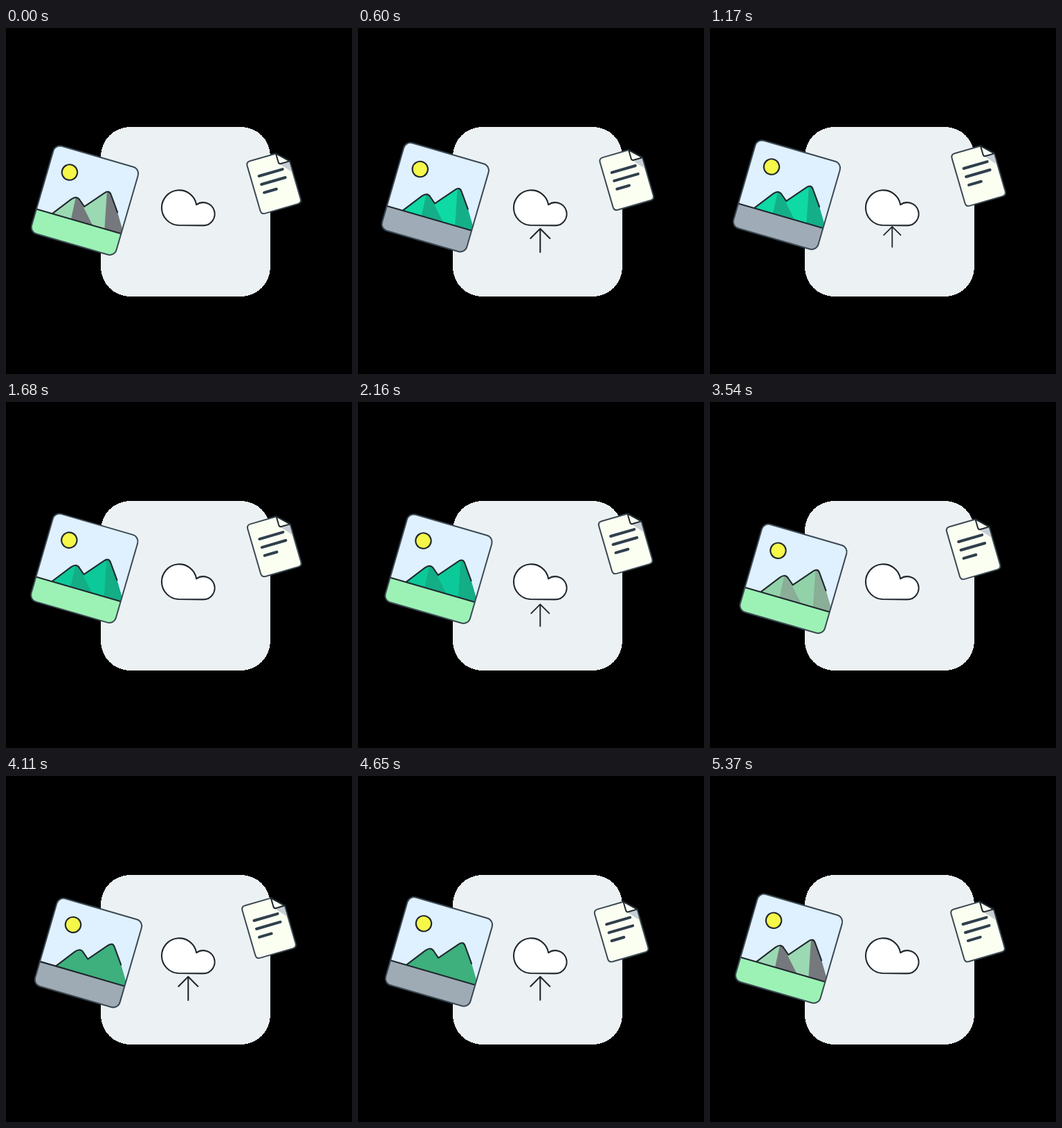
These frames come from a looping animation (500x500 px, 5.43 s). An HTML page:

```html
<!DOCTYPE html>
<html lang="en">
<head>
<meta charset="utf-8">
<title>Upload</title>
<style>
  html, body { margin: 0; width: 100%; height: 100%; overflow: hidden; background: #000; }
  svg { display: block; width: 100%; height: 100%; }
  .line { fill: none; stroke: #20282e; stroke-width: 2.1; stroke-linecap: round; stroke-linejoin: round; }
  .edge { stroke: #3a4852; stroke-width: 2; stroke-linejoin: round; }
</style>
</head>
<body>
<svg viewBox="0 0 500 500">
  <defs>
    <clipPath id="frame"><rect x="-63.5" y="-66.3" width="127.5" height="132" rx="10"/></clipPath>
  </defs>
  <rect x="137" y="143" width="245" height="245" rx="42.5" fill="#ecf1f4" shape-rendering="crispEdges"/>

  <path id="arrow" class="line" d="M0 34V0M-14 14L0 0L14 14"/>
  <path class="line" style="fill:#fff" d="M249 285A25.3 25.3 0 1 1 275.2 255.4A16.6 16.6 0 1 1 285 285.4Z"/>

  <g id="photo">
    <g clip-path="url(#frame)">
      <rect x="-65" y="-68" width="130" height="135" fill="#dff0ff"/>
      <path id="hills" d="M-39.5 31L-19 3.5Q-12.5 -4.5 -6.5 1.5L2 8.5L24 -18Q30 -25.5 34.5 -18.5L50.3 3L68 31Z"/>
      <path id="shade" d="M-13.5 -.5L-11.5 31H21L-6.5 1.5Q-10 -2 -13.5 -.5ZM27.5 -21L39 31H68L50.3 3L34.5 -18.5Q31 -23 27.5 -21Z"/>
      <rect id="ground" x="-65" y="31" width="130" height="36"/>
      <path class="line" d="M-65 31.2H65M-39.5 31L-19 3.5Q-12.5 -4.5 -6.5 1.5L2 8.5L24 -18Q30 -25.5 34.5 -18.5L50.3 3"/>
    </g>
    <circle class="line" style="fill:#f5f749" cx="-32.2" cy="-33.2" r="11.2"/>
    <rect class="edge" x="-63.5" y="-66.3" width="127.5" height="132" rx="10" fill="none"/>
  </g>

  <g id="note">
    <path class="edge" fill="#fbfff2" d="M-24 -41H15L31 -25V32Q31 37.7 25.3 37.7H-24Q-29.7 37.7 -29.7 32V-35.3Q-29.7 -41 -24 -41Z"/>
    <path fill="#c8cfd4" d="M16 -25H30V-9Z"/>
    <path class="line" style="fill:#fbfff5;stroke-width:2" d="M15 -41V-28Q15 -25 18 -25H31Z"/>
    <path class="line" style="stroke:#2f3f4c;stroke-width:4" d="M-17.5 -16.5H18M-17.5 -4H18.5M-17 8.5H1.5"/>
  </g>
</svg>
<script>
  const LOOP = 5430, STEP = 30, LAST = 5370, CYCLE = 5400, ARROW_CYCLE = 1800;
  const el = id => document.getElementById(id);
  const [arrow, photo, note, hills, shade, ground] =
    ['arrow', 'photo', 'note', 'hills', 'shade', 'ground'].map(el);

  const times = [0, 1170, 2160, 2700, 3540, 4650];
  const photoX = [0, -3, 2.5, 4.5, 6.5, 3];
  const photoY = [0, -8, -8, -2.5, 6.2, 4.7];
  const noteX = [0, 1, -0.5, -4.5, -6.5, -6.5];
  const noteY = [0, -11, -20, -21, -12, 0.3];

  // Start time, hills, shaded slopes, ground
  const palettes = [
    [0, '#9bd9b3', '#75797d', '#9cf2b4'],
    [585, '#0fd9a5', '#14af88', '#9fabb7'],
    [1665, '#0cc999', '#13ad86', '#9cf2b4'],
    [2430, '#0fd9a5', '#14af88', '#a8afb0'],
    [3120, '#91d2a8', '#8aae98', '#9cf2b4'],
    [4095, '#3db07d', '#3db07d', '#9fabb4'],
    [5010, '#9bd9b3', '#75797d', '#9cf2b4']
  ];

  // Closed cubic curve through values at uneven times
  function loopCurve(values, t) {
    const n = times.length;
    const at = i => times[(i + n) % n] + CYCLE * Math.floor(i / n);
    const val = i => values[(i + n) % n];
    const slope = i => (val(i + 1) - val(i - 1)) / (at(i + 1) - at(i - 1));
    let i = n - 1;
    while (times[i] > t) i--;
    const span = at(i + 1) - at(i), u = (t - at(i)) / span, v = 1 - u;
    return val(i) * v * v * (1 + 2 * u) + val(i + 1) * u * u * (1 + 2 * v)
      + span * u * v * (slope(i) * v - slope(i + 1) * u);
  }

  function smooth(t, from, to) {
    const u = Math.min(1, Math.max(0, (t - from) / (to - from)));
    return u * u * (3 - 2 * u);
  }

  function place(node, x, y, angle) {
    node.setAttribute('transform', `translate(${x} ${y}) rotate(${angle})`);
  }

  function drawArrow(t) {
    const grow = smooth(t, 0, 430), leave = 1 - smooth(t, 1030, 1640);
    const scale = grow * leave;
    // Grows up from its foot, then shrinks into the cloud
    const tip = 268 + (324 - 34 * grow - 268) * leave;
    arrow.style.display = scale > 0.01 ? '' : 'none';
    arrow.setAttribute('transform', `translate(263.3 ${tip}) scale(${scale})`);
  }

  function draw(t) {
    place(photo, 113.6 + loopCurve(photoX, t), 249.4 + loopCurve(photoY, t), 16.2);
    place(note, 387 + loopCurve(noteX, t), 225 + loopCurve(noteY, t), -16.2);
    drawArrow(t % ARROW_CYCLE);
    const colors = palettes.filter(p => p[0] <= t).pop();
    [hills, shade, ground].forEach((node, i) => node.setAttribute('fill', colors[i + 1]));
  }

  const start = performance.now();
  function tick() {
    const t = (performance.now() - start) % LOOP;
    draw(Math.min(Math.floor(t / STEP) * STEP, LAST));
    requestAnimationFrame(tick);
  }
  tick();
</script>
</body>
</html>
```
